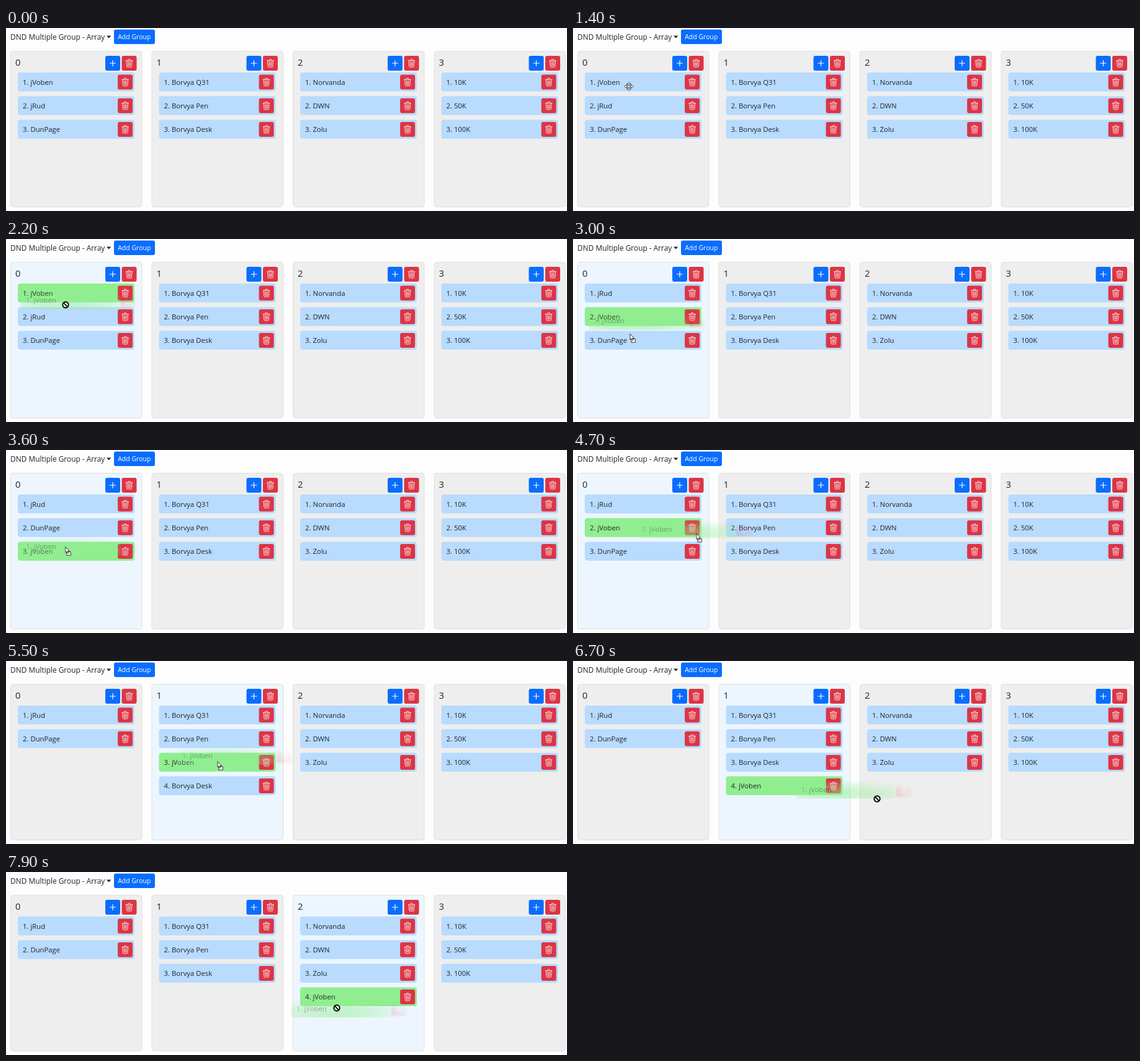
Recreate the animation shown at these times as an HTML page. Size 904 px wide and 296 px high, loop 8 s.

```html
<!DOCTYPE html>
<html lang="en">
<head>
<meta charset="utf-8">
<title>DND Multiple Group</title>
<style>
  html, body { margin: 0; width: 100%; height: 100%; overflow: hidden; background: #fdfdfd; }
  svg { display: block; width: 904px; height: 296px; }
  text { font-family: "Open Sans", "Noto Sans", sans-serif; font-size: 11.3px; fill: #212529; white-space: pre; }
  .head { font-size: 11.9px; }
  .title { font-size: 14.8px; }
  .add { font-size: 10.5px; fill: #fff; text-anchor: middle; }
  .col { fill: #eee; stroke: #dfdfdf; }
  .col.over { fill: #edf6fe; }
  .item { fill: #b8dbfe; }
  .item.drag { fill: #90ee90; }
  .blue { fill: #0a6dfd; }
  .red { fill: #dc3545; }
  .icon { fill: none; stroke: #fff; stroke-linecap: round; }
  .pointer { fill: #fff; stroke: #222; stroke-width: .9; stroke-linejoin: round; }
</style>
</head>
<body>
<svg viewBox="0 0 904 296">
  <defs>
    <path id="trash" class="icon" d="M1.5 3H14.5M2.5 3l.9 11.1a1.5 1.5 0 0 0 1.5 1.4h6.2a1.5 1.5 0 0 0 1.5-1.4L13.5 3M5.5 3V1.5a1 1 0 0 1 1-1h3a1 1 0 0 1 1 1V3M5.5 5.5l.4 7.5M8 5.5V13M10.5 5.5l-.4 7.5"/>
    <path id="plus" class="icon" stroke-width="1.4" d="M8 2.5V13.5M2.5 8H13.5"/>
    <radialGradient id="fade" gradientUnits="userSpaceOnUse" r="1" gradientTransform="translate(90 95) scale(128 24)" cx="0" cy="0">
      <stop offset="0" stop-color="#fff" stop-opacity=".5"/>
      <stop offset=".4" stop-color="#fff" stop-opacity=".38"/>
      <stop offset=".8" stop-color="#fff" stop-opacity=".1"/>
      <stop offset="1" stop-color="#fff" stop-opacity="0"/>
    </radialGradient>
    <mask id="glow" maskUnits="userSpaceOnUse" x="0" y="60" width="230" height="60">
      <rect y="60" width="230" height="60" fill="url(#fade)"/>
    </mask>
  </defs>
  <text class="head" x="7" y="19.2">DND Multiple Group - Array</text>
  <path d="M162 12.6h7.4l-3.7 3.8z" fill="#212529"/>
  <rect class="blue" x="174" y="2.4" width="66" height="23.6" rx="3"/>
  <text class="add" x="206.8" y="18.2">Add Group</text>
  <g id="board"></g>
  <g id="ghost" mask="url(#glow)"></g>
  <g id="cursor">
    <path id="move" class="pointer" d="M0-7 3-4H1V-1H4V-3L7 0 4 3V1H1V4H3L0 7-3 4H-1V1H-4V3L-7 0-4-3V-1H-1V-4H-3Z"/>
    <rect id="badge" class="pointer" x="1.8" y="7.6" width="6.6" height="5.6"/>
    <path id="arrow" class="pointer" d="M0-.5V8.8L2 7 3.5 10.2 5 9.5 3.6 6.4H6.4Z"/>
    <g id="deny" fill="#fff" stroke="#000" stroke-width="1.9">
      <circle r="4.7"/><path d="M-3.3-3.3 3.3 3.3"/>
    </g>
  </g>
</svg>
<script>
const LOOP = 8000, STEP = 100, LAG = 50;
const SHOW_FROM = 400, DRAG_FROM = 1800;
const COL = { x: 7, y: 37.5, w: 212, h: 252, pitch: 227.5 };
const ROW = { dx: 12, y: 72, w: 188, h: 30.5, pitch: 38.2 };
const BTN = 24;
const GRAB = { x: 90, y: 93 };
const DRAGGED = 'jVoben';
const GROUPS = [
  ['jRud', 'DunPage'],
  ['Borvya Q31', 'Borvya Pen', 'Borvya Desk'],
  ['Norvanda', 'DWN', 'Zolu'],
  ['10K', '50K', '100K']
];
// pointer stops: time, x, y
const PATH = [
  [400, 276, 284], [1200, 90, 95], [1800, 90, 93], [2600, 102, 120],
  [2900, 102, 121], [3000, 92, 154], [3500, 95, 163], [3900, 101, 125],
  [4400, 101, 125], [5100, 350, 152], [5400, 353, 153], [5500, 341, 163],
  [6100, 350, 198], [6600, 372, 203], [6700, 490, 223], [7200, 529, 232],
  [7800, 529, 232], [7900, 533, 220]
];

const $ = id => document.getElementById(id);
const colX = c => COL.x + c * COL.pitch;
const rowY = r => ROW.y + r * ROW.pitch;
const ease = p => p * p * (3 - 2 * p);

function button(x, y, icon, color) {
  return `<rect class="${color}" x="${x}" y="${y}" width="${BTN}" height="${BTN}" rx="3"/>` +
    `<use href="#${icon}" transform="translate(${x + 5.4} ${y + 5.4}) scale(.825)"/>`;
}

function item(c, r, name, drag) {
  const x = colX(c) + ROW.dx, y = rowY(r);
  return `<rect class="item${drag ? ' drag' : ''}" x="${x}" y="${y}" width="${ROW.w}" height="${ROW.h}" rx="4"/>` +
    `<text x="${x + 8}" y="${y + 19.7}">${r + 1}. ${name}</text>` +
    button(x + 161.1, y + 3.5, 'trash', 'red');
}

function column(c, names, over, drag) {
  const x = colX(c);
  return `<rect class="col${over ? ' over' : ''}" x="${x + .5}" y="${COL.y}" width="${COL.w - .5}" height="${COL.h}" rx="4"/>` +
    `<text class="title" x="${x + 8}" y="61">${c}</text>` +
    button(x + 153, 45, 'plus', 'blue') + button(x + 179.5, 45, 'trash', 'red') +
    names.map((n, r) => item(c, r, n, drag && n === DRAGGED)).join('');
}

function pointAt(t) {
  const i = PATH.findIndex(k => k[0] > t);
  const [b, bx, by] = PATH.at(i);
  if (i < 1) return { x: bx, y: by };
  const [a, ax, ay] = PATH[i - 1], p = ease((t - a) / (b - a));
  return { x: ax + (bx - ax) * p, y: ay + (by - ay) * p };
}

function listsFor({ group, pos }) {
  const lists = GROUPS.map(g => g.slice());
  lists[group].splice(pos, 0, DRAGGED);
  return lists;
}

// column and row under a point, -1 where there is none
function hitTest({ x, y }, lists) {
  const c = Math.floor((x - COL.x) / COL.pitch), dx = x - colX(c);
  const r = Math.floor((y - ROW.y) / ROW.pitch);
  const inItem = dx >= ROW.dx && dx <= ROW.dx + ROW.w && y <= rowY(r) + ROW.h;
  return {
    group: dx <= COL.w ? c : -1,
    row: inItem && r < lists[c].length ? r : -1
  };
}

// the dragged item takes the row under the pointer, or the end of a new column
function nextPlace(place, point) {
  const { group, row } = hitTest(point, listsFor(place));
  if (group < 0 || (group === place.group && (row < 0 || row === place.pos))) return place;
  return { group, pos: row < 0 ? GROUPS[group].length : row };
}

const places = [{ group: 0, pos: 0 }];
for (let t = STEP; t < LOOP; t += STEP) {
  const last = places.at(-1);
  places.push(t > DRAG_FROM ? nextPlace(last, pointAt(t - STEP)) : last);
}

const show = (id, on) => { $(id).style.display = on ? '' : 'none'; };
const shift = (id, x, y) => $(id).setAttribute('transform', `translate(${x} ${y})`);

let shown = '';

function draw(time) {
  const t = Math.floor((time % LOOP) / STEP) * STEP;
  const place = places[t / STEP], lists = listsFor(place);
  const drag = t >= DRAG_FROM;

  const html = lists.map((names, c) => column(c, names, drag && c === place.group, drag)).join('');
  if (html !== shown) $('board').innerHTML = shown = html;

  const point = pointAt(t), hit = hitTest(point, lists).row >= 0;
  shift('cursor', point.x, point.y);
  show('cursor', t >= SHOW_FROM);
  show('move', !drag && hit);
  show('arrow', drag === hit);
  show('badge', drag && hit);
  show('deny', drag && !hit);

  const late = pointAt(t - LAG);
  shift('ghost', late.x - GRAB.x, late.y - GRAB.y);
  show('ghost', drag);
}

$('ghost').innerHTML = item(0, 0, DRAGGED, true);
const start = performance.now();
function tick() {
  draw(performance.now() - start);
  requestAnimationFrame(tick);
}
tick();
</script>
</body>
</html>
```
